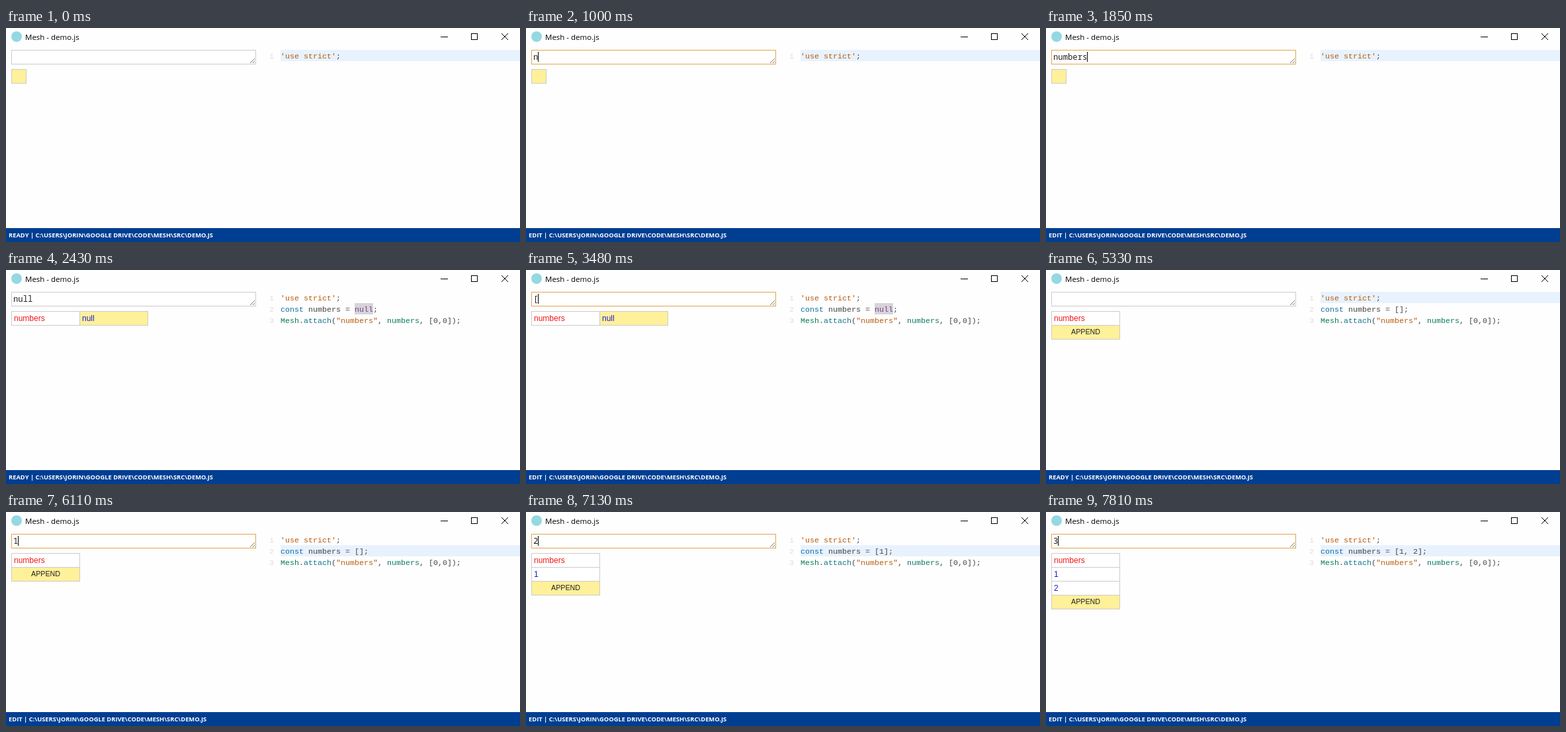
An HTML page that plays this animation: 777 px wide and 323 px high, repeating every 8000 ms.

```html
<!DOCTYPE html>
<html lang="en">
<head>
<meta charset="utf-8">
<title>Mesh - demo.js</title>
<style>
  html, body { margin: 0; width: 100%; height: 100%; overflow: hidden; background: #fefefe; }
  svg { display: block; }
  text { white-space: pre; }
  .title { font: 11.5px "Open Sans", "Noto Sans", sans-serif; }
  .status { font: bold 9.35px "Open Sans", "Noto Sans", sans-serif; fill: #fff; }
  .input { font: 12.22px "Noto Sans Mono", monospace; fill: #222; }
  .cell { font: 12px "Liberation Sans", Arial, sans-serif; }
  .append { font: 10.7px "Liberation Sans", Arial, sans-serif; fill: #222; text-anchor: middle; }
  .code { font: 11.667px "Liberation Mono", "Courier New", monospace; fill: #444; }
</style>
</head>
<body>
<svg id="stage" width="777" height="323" viewBox="0 0 777 323"></svg>
<script>
const LOOP = 8000;
const COLORS = {
  string: '#b85c0c', keyword: '#0f6fa6', object: '#0b7b51',
  method: '#17758a', variable: '#0b7b62', atom: '#7a3a98', number: '#ddd',
};
const PATH = 'C:\\USERS\\JORIN\\GOOGLE DRIVE\\CODE\\MESH\\SRC\\DEMO.JS';

// Each step lists only what changes at its time.
const edit = (time, input) => [time, { mode: 'EDIT', input, caret: true }];
const ready = (time, changes) => [time, { mode: 'READY', input: '', caret: false, ...changes }];

const steps = [
  ready(0, { rows: [['']], selected: [0, 0], value: null, activeLine: 0, marked: false }),
  edit(1000, 'n'),
  edit(1150, 'nu'),
  edit(1300, 'num'),
  edit(1510, 'numb'),
  edit(1660, 'numbe'),
  edit(1755, 'number'),
  edit(1850, 'numbers'),
  ready(2340, { input: 'null', rows: [['numbers', 'null']], selected: [0, 1], value: 'null' }),
  [2430, { activeLine: -1, marked: true }],
  edit(3480, '['),
  edit(3600, '[]'),
  [4160, { caret: false }],
  [4620, { caret: true }],
  ready(4930, {
    rows: [['numbers', ''], ['APPEND', '']], selected: [1, 1],
    value: '[]', activeLine: 0, marked: false,
  }),
  [5330, { rows: [['numbers'], ['APPEND']], selected: [1, 0] }],
  [5420, { activeLine: 1 }],
  edit(6110, '1'),
  ready(6670, { rows: [['numbers'], ['1'], ['APPEND']], selected: [2, 0], value: '[1]' }),
  edit(7130, '2'),
  ready(7570, { rows: [['numbers'], ['1'], ['2'], ['APPEND']], selected: [3, 0], value: '[1, 2]' }),
  edit(7810, '3'),
];

const rect = (x, y, w, h, fill) => `<rect x="${x}" y="${y}" width="${w}" height="${h}" fill="${fill}"/>`;
const box = (x, y, w, h, fill, stroke) =>
  `<rect x="${x + .5}" y="${y + .5}" width="${w}" height="${h}" fill="${fill}" stroke="${stroke}"/>`;
const line = (d, color) => `<path d="${d}" fill="none" stroke="${color}"/>`;
const text = (x, y, kind, content, fill) =>
  `<text x="${x}" y="${y}" class="${kind}"${fill ? ` style="fill:${fill}"` : ''}>${content}</text>`;

function drawTitleBar() {
  return '<circle cx="16" cy="13" r="8" fill="#94d8e2"/>' +
    text(29, 18, 'title', 'Mesh - demo.js', '#000') +
    line('M657 13.5h11', '#000') +
    box(703, 8, 9, 9, 'none', '#000') +
    line('M749 8l10 10M759 8l-10 10', '#000');
}

function drawInput({ mode, input, caret }) {
  const caretX = Math.round(11 + 7.333 * input.length);
  return box(8, 33, 369, 21, '#fff', mode === 'EDIT' ? '#dba850' : '#ccc') +
    line('M369 53l7-7M373 53l3-3', '#777') +
    text(11, 48, 'input', input) +
    (caret ? rect(caretX, 36, 1, 15, '#000') : '');
}

function drawCell(x, y, width, content, isSelected) {
  const isAppend = content === 'APPEND';
  const fill = isSelected ? '#fff09a' : isAppend ? '#ffe8cc' : '#fff';
  const label = isAppend
    ? text(x + 52, y + 14, 'append', content)
    : text(x + 4, y + 15, 'cell', content, content === 'numbers' ? '#f01818' : '#1c1cd8');
  return box(x, y, width, 21, fill, '#ccc') + label;
}

function drawSheet({ rows, selected }) {
  let out = '';
  rows.forEach((row, r) => {
    let x = 8;
    row.forEach((content, c) => {
      const width = rows.some(other => other[c]) ? 103 : 22;
      out += drawCell(x, 62 + 21 * r, width, content, r === selected[0] && c === selected[1]);
      x += width;
    });
  });
  return out;
}

function drawCode({ value, activeLine, marked }) {
  const span = (kind, content) => `<tspan fill="${COLORS[kind]}">${content}</tspan>`;
  const lines = [span('string', "'use strict'") + ';'];
  if (value) {
    lines.push(
      span('keyword', 'const') + ' numbers = ' + (value === 'null' ? span('atom', value) : value) + ';',
      span('object', 'Mesh') + '.' + span('method', 'attach') + '(' + span('string', '"numbers"') +
        ', ' + span('variable', 'numbers') + ', [0,0]);');
  }
  return (activeLine >= 0 ? rect(415, 33 + 17 * activeLine, 362, 17, '#e8f2ff') : '') +
    (marked ? rect(527, 50, 28, 17, '#d7d4d7') : '') +
    lines.map((content, i) =>
      text(398, 46 + 17 * i, 'code', i + 1, COLORS.number) +
      text(415, 46 + 17 * i, 'code', content)).join('');
}

const drawStatus = ({ mode }) =>
  rect(0, 302, 777, 21, '#003e92') + text(4, 316, 'status', `${mode} | ${PATH}`);

const stage = document.getElementById('stage');
let shown = -1;

function render() {
  const time = performance.now() % LOOP;
  const count = steps.filter(([start]) => start <= time).length;
  if (count !== shown) {
    shown = count;
    const state = Object.assign({}, ...steps.slice(0, count).map(([, changes]) => changes));
    stage.innerHTML = drawTitleBar() + drawInput(state) + drawSheet(state) +
      drawCode(state) + drawStatus(state);
  }
  requestAnimationFrame(render);
}
render();
</script>
</body>
</html>
```
